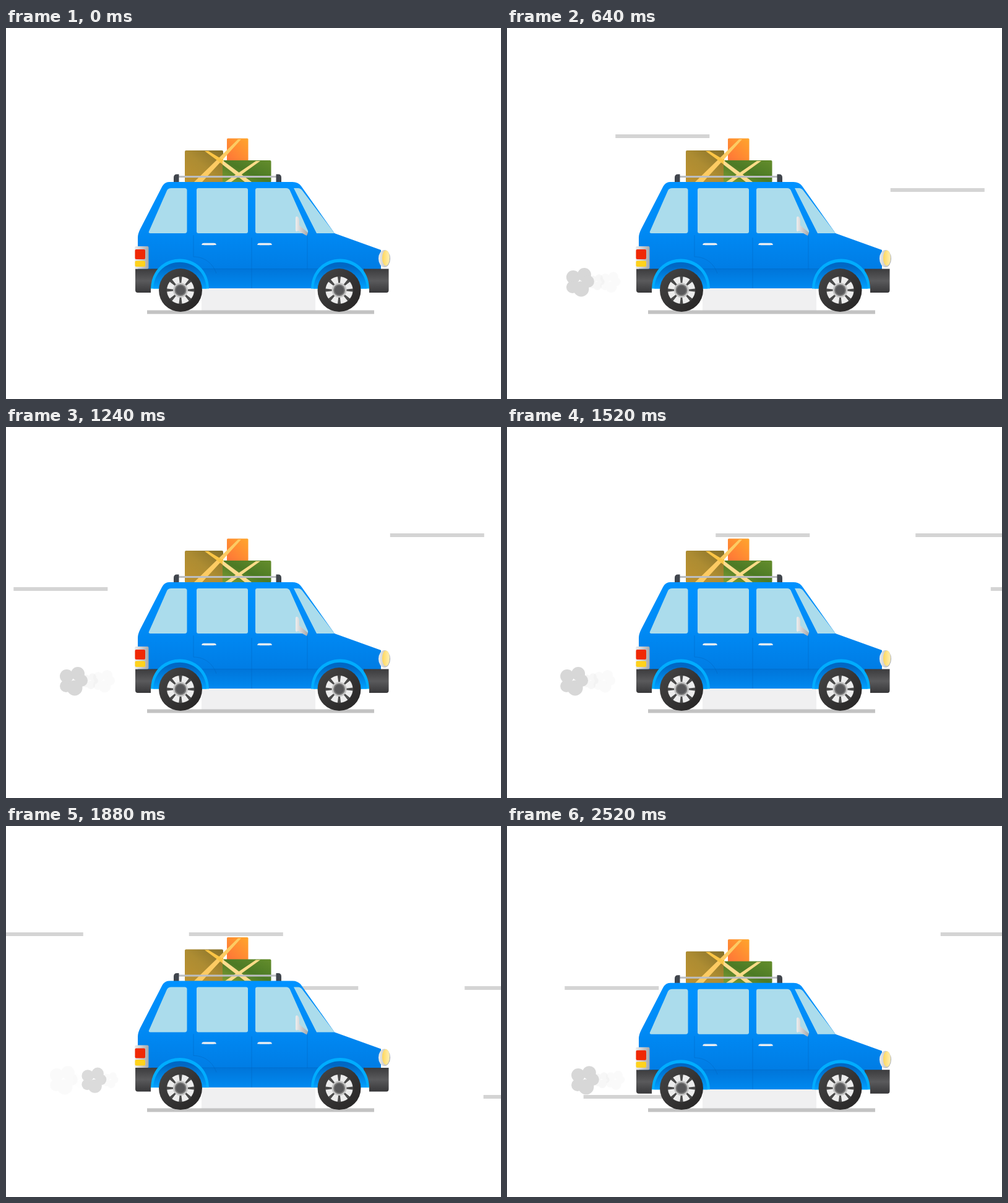
Animation of 800x600 px, one loop 2.56 s. Source, as an HTML page:

```html
<!DOCTYPE html>
<html lang="en">
<head>
<meta charset="utf-8">
<title>Road trip</title>
<style>
  html, body { margin: 0; height: 100%; overflow: hidden; background: #fff; }
  svg { display: block; width: 100vw; height: 100vh; }
</style>
</head>
<body>
<svg viewBox="0 0 800 600">
  <defs>
    <linearGradient id="paint" x2="0" y2="1">
      <stop offset="0" stop-color="#0092ff"/><stop offset=".45" stop-color="#008af5"/>
      <stop offset="1" stop-color="#0076dc"/>
    </linearGradient>
    <linearGradient id="sill" x2="0" y2="1">
      <stop stop-color="#0075d9"/><stop offset="1" stop-color="#0089f0"/>
    </linearGradient>
    <linearGradient id="well" x2="0" y2="1">
      <stop offset=".15" stop-color="#0067c4"/><stop offset="1" stop-color="#00a0ff"/>
    </linearGradient>
    <linearGradient id="bumper" x2="0" y2="1">
      <stop stop-color="#3c3c3e"/><stop offset=".5" stop-color="#5a5a5c"/><stop offset="1" stop-color="#38383a"/>
    </linearGradient>
    <linearGradient id="metal" x2="1" y2="0">
      <stop stop-color="#eee"/><stop offset="1" stop-color="#a5a8ac"/>
    </linearGradient>
    <linearGradient id="lamp" x2="1" y2="0">
      <stop stop-color="#ffd75c"/><stop offset="1" stop-color="#fff0b4"/>
    </linearGradient>
    <linearGradient id="brown" y1="1" x2="1" y2="0">
      <stop stop-color="#bd9231"/><stop offset=".5" stop-color="#ad8c32"/><stop offset="1" stop-color="#84702a"/>
    </linearGradient>
    <linearGradient id="green" y1="1" x2="1" y2="0">
      <stop stop-color="#7f9c34"/><stop offset=".5" stop-color="#4c7a25"/><stop offset="1" stop-color="#648d2c"/>
    </linearGradient>
    <linearGradient id="orange" y1="1" x2="1" y2="0">
      <stop stop-color="#ff7338"/><stop offset="1" stop-color="#ffa62c"/>
    </linearGradient>
    <linearGradient id="tyre" x2="1" y2="1">
      <stop stop-color="#464646"/><stop offset="1" stop-color="#252323"/>
    </linearGradient>
    <g id="arch">
      <path d="M-47 0C-45-64 45-64 47 0Z" fill="#00adff"/>
      <path d="M-43 0C-40-57 40-57 43 0Z" fill="url(#well)"/>
    </g>
    <g id="rim">
      <circle r="22.5" fill="#4a4a4a"/>
      <circle r="16.5" fill="none" stroke="#ececec" stroke-width="11" pathLength="16"
        stroke-dasharray="1.4 .6" stroke-dashoffset="-.3"/>
      <circle r="12" fill="#c5c5c5"/>
      <circle r="9.5" fill="#777"/>
      <circle r="7.5" fill="#58585a"/>
    </g>
    <g id="puff" fill="#d7d7d7">
      <circle cx="-11" cy="-8" r="11"/><circle cx="7" cy="-12" r="11"/>
      <circle cx="-12" cy="8" r="10"/><circle cx="2" cy="11" r="12.5"/>
      <circle cx="13" cy="-1" r="10"/>
    </g>
  </defs>

  <g id="streaks" fill="#d4d4d4"></g>
  <path d="M316 415H500V457H316Z" fill="#f0f0f1"/>
  <path d="M228 456.5H595V462.5H228Z" fill="#c3c3c3"/>

  <g id="car">
    <rect x="289" y="198" width="62" height="52" rx="2" fill="url(#brown)"/>
    <rect x="357" y="178.500" width="34.500" height="36.500" rx="1.500" fill="url(#orange)"/>
    <rect x="350" y="214" width="78.500" height="36" rx="2" fill="url(#green)"/>
    <path d="M375 180H380L352 211 317 249H304Z" fill="#fdcb63"/>
    <path d="M321 199H327L352 214V222Z" fill="#fcc545"/>
    <path d="M350 214 397 249H386L350 221Z" fill="#fddc8e"/>
    <path d="M404 215H411L364 249H354Z" fill="#fbdb88"/>
    <path d="M279 240.500H438" stroke="#bcbec1" stroke-width="3"/>
    <path d="M271 250V242Q271 236.500 276 236.500H279.500V250ZM445 250V242Q445 236.500 440 236.500H436.500V250Z" fill="#41464d"/>

    <path d="M213 421V339Q213 333 217 325L252 257Q256 249 264 249H463Q473 249 478 257L531 332 606 359V421Z" fill="url(#paint)"/>
    <path d="M235 389.500H580V421H235Z" fill="url(#sill)"/>
    <g fill="#abdcec">
      <path d="M267 259H289Q292 259 292.500 262V328Q292.500 332 289 332H233Q230 332 231 329L260 263Q262 259 267 259Z"/>
      <rect x="308" y="259" width="83" height="73" rx="3"/>
      <path d="M406 259H453Q457 259 459 263L488 328Q489 332 485 332H406Q403 332 403 329V262Q403 259 406 259Z"/>
      <path d="M465 259H472Q476 259 479 263L531 332H502Z"/>
    </g>
    <path d="M397 339V421M487 335V390M303 335V370C322 370 335 382 340 397M235 389.500H580"
      fill="none" stroke="#0064bd" stroke-opacity=".45"/>
    <path d="M318 351Q318 349.500 320 349.500H336Q338 349.500 338 351M408 351Q408 349.500 410 349.500H426Q428 349.500 428 351"
      fill="none" stroke="#e9edf2" stroke-width="3.500"/>
    <path d="M468 308Q468 304 471 305 474 307 474 312V319L488 331 486 336 472 328Q468 331 468 326Z" fill="url(#metal)"/>

    <path d="M209 389.500H250V428H213Q209 428 209 424ZM578 389.500H618.500V424Q618.500 428 615 428H578Z" fill="url(#bumper)"/>
    <path d="M234 420H250V430H234ZM578 420H587V430H578Z" fill="#fff"/>
    <use href="#arch" x="281" y="421.500"/>
    <use href="#arch" x="540" y="421.500"/>
    <rect x="208" y="353" width="22.500" height="36.500" rx="2" fill="url(#metal)"/>
    <rect x="208.500" y="358" width="16.500" height="16" rx="2" fill="#f02804"/>
    <rect x="208.500" y="376.500" width="16.500" height="9.500" rx="2" fill="#ffd21c"/>
    <ellipse cx="611.500" cy="373" rx="9.500" ry="14" fill="url(#metal)"/>
    <ellipse cx="614" cy="372" rx="6" ry="12.500" fill="url(#lamp)"/>
  </g>

  <g fill="url(#tyre)">
    <circle cx="282" cy="424" r="35"/><circle cx="538.500" cy="424" r="35"/>
  </g>
  <use class="rim" href="#rim" data-x="282"/>
  <use class="rim" href="#rim" data-x="538.500"/>
  <g id="smoke"></g>
</svg>

<script>
const LOOP = 2560, STEP = 40;
const $ = id => document.getElementById(id);
const rims = document.querySelectorAll('.rim');
const clamp = v => Math.max(0, Math.min(1, v));

// Each streak: entry time at the right edge, height
const streaks = [[23, 175], [462, 262], [1063, 175], [1382, 175],
  [1502, 262], [1822, 262], [1852, 438], [2422, 175]];
// Suspension travel: time, drop
const bounce = [[0, 0], [320, 1.3], [640, 0], [1000, 2.1], [1520, 2], [1880, 1.4], [2520, 4.8], [2560, 5]];

function drop(t) {
  const i = bounce.findIndex(k => k[0] > t);
  const [t0, y0] = bounce[i - 1], [t1, y1] = bounce[i];
  return y0 + (y1 - y0) * (1 - Math.cos(Math.PI * (t - t0) / (t1 - t0))) / 2;
}

const puff = (x, scale, opacity) =>
  `<use href="#puff" transform="translate(${x} 411) scale(${scale})" opacity="${opacity}"/>`;

function smoke(t) {
  let out = '';
  for (let birth = 263; birth <= t; birth += 275) {
    const x = 185 - .178 * (t - birth);
    if (x < 92) continue;
    const fade = clamp((x - 92) / 9);
    const grow = clamp((185 - x) / 60);
    out += puff(x + 27, .55, .18 * fade * clamp((150 - x) / 15));
    out += puff(x, .6 + .4 * grow, fade * (.12 + .88 * clamp((156 - x) / 16)));
  }
  return out;
}

function draw(now) {
  const t = Math.floor(now % LOOP / STEP) * STEP;
  $('streaks').innerHTML = streaks.filter(s => s[0] <= t).map(([start, y]) =>
    `<rect x="${800 - 1.0125 * (t - start)}" y="${y - 3}" width="152" height="6"/>`).join('');
  $('car').setAttribute('transform', `translate(0 ${drop(t)})`);
  rims.forEach(r => r.setAttribute('transform',
    `translate(${r.dataset.x} 424) rotate(${t / 320 * 360})`));
  $('smoke').innerHTML = smoke(t);
}

let begin;
function tick(now) {
  begin ??= now;
  draw(now - begin);
  requestAnimationFrame(tick);
}
draw(0);
requestAnimationFrame(tick);
</script>
</body>
</html>
```
